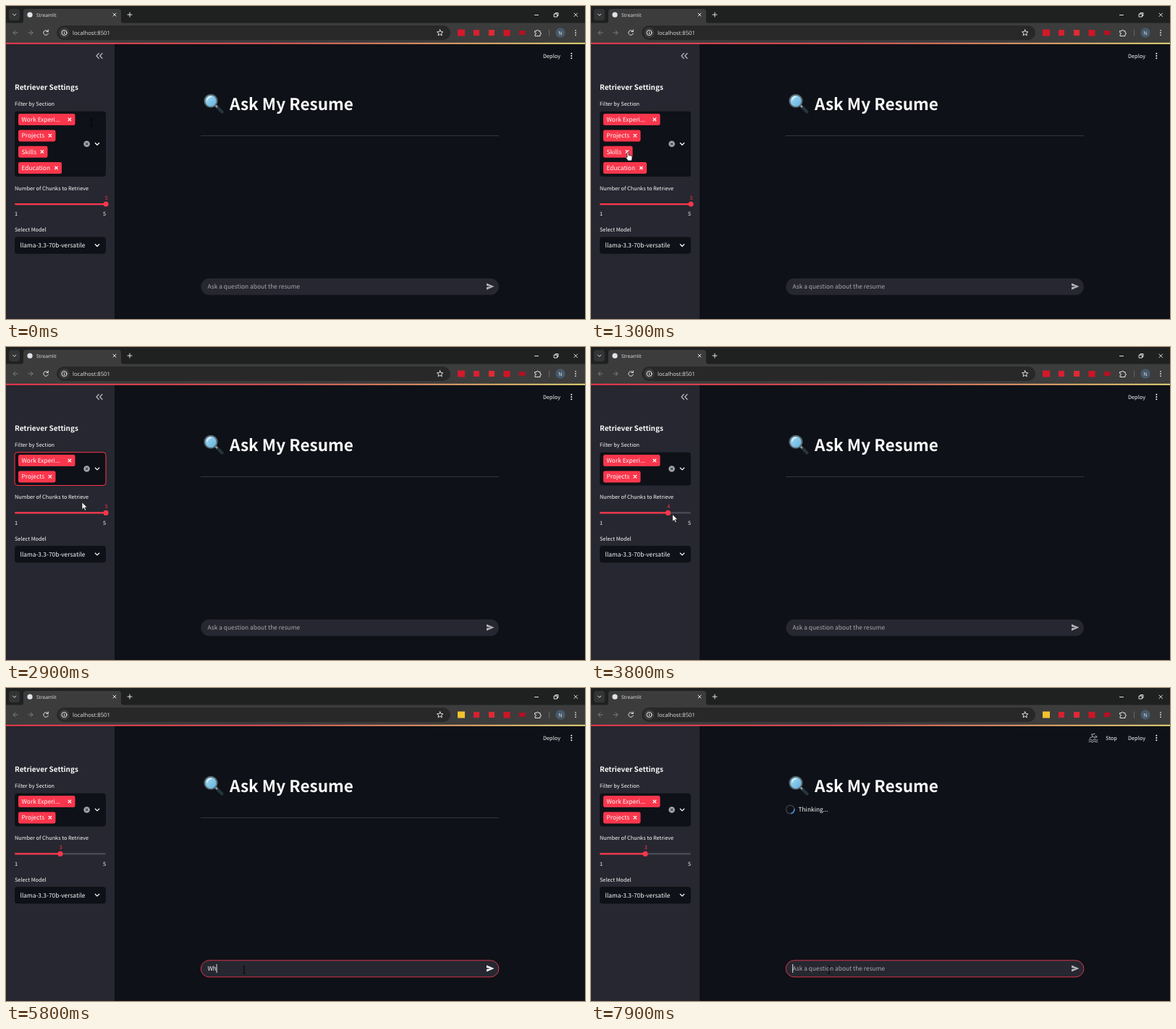
Write an HTML page that moves like this. It is 800 px wide and 433 px high and loops after 8 s.

```html
<!DOCTYPE html>
<html lang="en">
<head>
<meta charset="utf-8">
<title>Ask My Resume</title>
<style>
  html, body { margin: 0; width: 100%; height: 100%; overflow: hidden; background: #0e1117; }
  svg { display: block; width: 100vw; height: 100vh; }
  text { font-family: "Noto Sans CJK JP", "Noto Sans CJK SC", "Noto Sans CJK", sans-serif; font-size: 8.4px; fill: #fafafa; text-rendering: geometricPrecision; white-space: pre; }
  .small { font-size: 7.34px; }
  .chrome { font-family: "Open Sans", "Noto Sans", sans-serif; fill: #e3e3e3; }
  .red { fill: #fa364c; }
  .line { fill: none; stroke: #e3e3e3; stroke-width: 1; stroke-linecap: round; stroke-linejoin: round; }
  .dim { stroke: #7d7d7d; }
  .white { stroke: #fafafa; stroke-width: 1.3; }
</style>
</head>
<body>
<svg viewBox="0 0 800 433" preserveAspectRatio="none">
  <defs>
    <linearGradient id="bar"><stop stop-color="#f5384b"/><stop offset=".45" stop-color="#e8575a"/><stop offset="1" stop-color="#f0e27a"/></linearGradient>
    <linearGradient id="lens" x2="1" y2="1"><stop stop-color="#a9dcf4"/><stop offset="1" stop-color="#5fb0dc"/></linearGradient>
  </defs>

  <!-- browser window -->
  <rect width="800" height="52" fill="#1f2020"/>
  <rect x="4" y="4" width="15" height="16" rx="4" fill="#333435"/>
  <path class="line" d="M9.5 11l2.2 2.2 2.2-2.2"/>
  <path d="M20 24q4 0 4-4V8q0-4 4-4H155q4 0 4 4v12q0 4 4 4z" fill="#3c3c3c"/>
  <circle cx="33" cy="12.2" r="3.6" fill="#dfe2e8"/>
  <text class="chrome" x="42" y="14.7" style="font-size:6.6px">Streamlit</text>
  <path class="line" d="M148 10l4 4m0-4l-4 4M168 12h6m-3-3v6M730.500 12.500h5M785 10l4.500 4.500m0-4.500l-4.500 4.500M757.500 11h4v4h-4zM759 11V9.500h4V13.500h-1.500"/>
  <rect y="23.500" width="800" height="28" fill="#3c3c3c"/>
  <path class="line dim" d="M16 37h-6m3-3l-3 3l3 3M31 37h6m-3-3l3 3l-3 3"/>
  <path class="line" d="M57.800 35A3.300 3.300 0 1 0 58.300 38M58.300 33v2.500h-2.500"/>
  <rect x="70" y="27" width="544" height="20" rx="10" fill="#282828"/>
  <circle cx="80.500" cy="37" r="7" fill="#3c3c3c"/>
  <circle class="line" cx="80.500" cy="37" r="3.500"/>
  <path class="line" d="M80.500 36.800v1.700M80.500 35.200v.01"/>
  <text class="chrome" x="92" y="39.700" style="font-size:7.7px">localhost:8501</text>
  <path id="star" class="line"/>
  <rect id="badge" x="624" y="32.500" width="10" height="9"/>
  <rect x="646" y="33" width="8" height="8" fill="#d81f30"/>
  <rect x="667" y="33" width="8" height="8" fill="#e02a35"/>
  <rect x="687.500" y="33" width="9" height="8.500" fill="#cf1525"/>
  <rect x="709" y="34" width="8.500" height="6" fill="#b01222"/>
  <path class="line" d="M731 34.500h2.200a1.300 1.300 0 0 1 2.600 0h2.200v2.200a1.300 1.300 0 0 1 0 2.600v2.200h-7v-2.200a1.300 1.300 0 0 0 0-2.600z"/>
  <path d="M750.500 32.500v9" stroke="#666"/>
  <circle cx="766" cy="37" r="6.700" fill="#465a6b"/>
  <text class="chrome" x="766" y="39.500" text-anchor="middle" style="font-size:7px">N</text>
  <g fill="#e3e3e3"><circle cx="787" cy="33.800" r=".9"/><circle cx="787" cy="37" r=".9"/><circle cx="787" cy="40.200" r=".9"/></g>

  <!-- page -->
  <rect y="51" width="800" height="382" fill="#0e1117"/>
  <rect y="51" width="150" height="382" fill="#262730"/>
  <rect y="50.800" width="800" height="1.900" fill="url(#bar)"/>
  <text class="small" x="742" y="71.600">Deploy</text>
  <g fill="#fafafa"><circle cx="781.300" cy="65.800" r="1"/><circle cx="781.300" cy="69" r="1"/><circle cx="781.300" cy="72.200" r="1"/></g>
  <g id="running">
    <text class="small" x="711" y="71.600">Stop</text>
    <g class="line" style="stroke:#b4b5ba">
      <circle cx="697.500" cy="67.500" r="1.300"/>
      <path d="M689 69.500l4.500-2.500-2-2.800 4.500-.8M693.500 67l2.500 2.500M688 71.800q1.500-1.200 3 0t3 0 3 0 3 0M688 74.300q1.500-1.200 3 0t3 0 3 0 3 0"/>
    </g>
  </g>

  <path d="M290.500 138.500l8 8" stroke="#26343c" stroke-width="4.200" stroke-linecap="round"/>
  <path d="M289 137l3 3" stroke="#8a969d" stroke-width="2.500"/>
  <circle cx="283" cy="131.300" r="8.600" fill="url(#lens)" stroke="#596970" stroke-width="1.900"/>
  <path d="M278 130q1-4 5-4.500" fill="none" stroke="#e6f6fd" stroke-width="1.500" stroke-linecap="round"/>
  <text x="309" y="143.500" font-weight="700" style="font-size:22.6px">Ask My Resume</text>
  <path id="divider" d="M269 179.500H681" stroke="#343640"/>
  <g id="thinking">
    <circle cx="275.300" cy="168" r="5.700" fill="none" stroke="#343741" stroke-width="1.700"/>
    <path id="arc" d="M275.300 162.300a5.700 5.700 0 0 1 5.700 5.700" fill="none" stroke="#4b86d8" stroke-width="1.700"/>
    <text x="286.500" y="171">Thinking...</text>
  </g>

  <rect id="field" x="269.300" y="376.800" width="411.600" height="23" rx="11.500" fill="#262730"/>
  <text id="question" x="278.500" y="391.100"></text>
  <path id="caret" d="M0 382v12" stroke="#fafafa" stroke-width=".9"/>
  <path id="send" d="M664 383.500l10.500 4.500-10.500 4.500v-3.500l6-1-6-1z"/>

  <!-- sidebar -->
  <path id="collapse" class="line" style="stroke:#b9bac0;stroke-width:1.200" d="M128.300 65.500l-3.300 3.500 3.300 3.500M133 65.500l-3.300 3.500 3.300 3.500"/>
  <text x="12" y="115.900" font-weight="700" style="font-size:9.95px">Retriever Settings</text>
  <text class="small" x="12" y="138.200">Filter by Section</text>
  <rect id="select" x="12" y="145.700" width="126" rx="4" fill="#0e1117"/>
  <g id="tags"></g>
  <g id="controls">
    <circle cx="111.600" r="4.300" fill="#a3a5ab"/>
    <path d="M110 -1.600l3.200 3.200m0-3.200l-3.200 3.200" stroke="#0e1117"/>
    <path class="line white" d="M123.300 -1.300l2.700 2.700 2.700-2.700"/>
  </g>
  <g id="lower">
    <text class="small" x="12" y="254.600">Number of Chunks to Retrieve</text>
    <text id="amount" class="small red" y="267.600" text-anchor="middle"></text>
    <rect x="12" y="272.900" width="126" height="2.300" rx="1.100" fill="#4a4c56"/>
    <rect id="fill" class="red" x="12" y="272.900" height="2.300" rx="1.100"/>
    <circle id="thumb" class="red" cy="274" r="3.600"/>
    <text class="small" x="12" y="290.200">1</text>
    <text class="small" x="138" y="290.200" text-anchor="end">5</text>
    <text class="small" x="12" y="312.400">Select Model</text>
    <rect x="12" y="319.500" width="126" height="23.300" rx="4" fill="#0e1117"/>
    <text x="19.500" y="334.200">llama-3.3-70b-versatile</text>
    <path class="line white" d="M123.300 329.800l2.700 2.700 2.700-2.700"/>
  </g>

  <g id="pointer" stroke-linejoin="round">
    <path id="arrow" d="M0 0v10l2.400-2.200 1.700 3.700 1.700-.8-1.700-3.500h3.200z" fill="#fff" stroke="#111" stroke-width=".7"/>
    <path id="hand" d="M-1 1q1-1.500 2 0v3.500q3 0 4.500 1.200.8.800.3 3.300l-.8 3H.2L-3 7.500q0-1.500 2 0z" fill="#fff" stroke="#111" stroke-width=".7"/>
    <path id="beam" d="M-1.500-5h3M-1.500 5h3M0-5V5" fill="none" stroke="#000" stroke-width=".9"/>
  </g>
</svg>
<script>
const LOOP = 8000, STEP = 100, ROW = 22.3;
const SKILLS_OFF = 1600, EDUCATION_OFF = 2500, DRAG = 3500, RELEASE = 4200;
const LEAVE = 4500, FOCUS = 5600, TYPE = 5700, TYPED = 6800, ENTER = 7400;
const THINK = 7500, RUNNING = 7700;
const QUESTION = "What are the key strengths?";
const HINT = "Ask a question about the resume";

// time, x, y of the pointer
const PATH = [
  [0, 118, 161], [500, 118, 161], [1000, 53, 203], [1300, 51, 202], [1700, 51, 202],
  [2100, 73, 200.5], [2600, 73, 200.5], [3200, 137, 229], [DRAG, 138, 229],
  [3800, 112.5, 231.5], [RELEASE, 75, 231.5], [4400, 76, 232],
  [4800, 303, 342], [5200, 329, 390], [LOOP, 329, 390]
];

const el = Object.fromEntries([...document.querySelectorAll("[id]")].map(n => [n.id, n]));
const set = (node, attrs) => Object.entries(attrs).forEach(([k, v]) => node.setAttribute(k, v));
const show = (node, on) => set(node, { visibility: on ? "visible" : "hidden" });
const move = (node, x, y) => set(node, { transform: `translate(${x} ${y})` });

function addTag(label, width) {
  const g = document.createElementNS("http://www.w3.org/2000/svg", "g");
  const x = width + 9.4;
  g.innerHTML = `<rect class="red" x="17" y="149.100" width="${width}" height="16" rx="2.300"/>
    <text x="21.500" y="160.200">${label}</text>
    <path class="line white" d="M${x - 1.8} 155.200l3.600 3.600m0-3.600l-3.600 3.600"/>`;
  el.tags.append(g);
  return g;
}
const tags = [["Work Experi...", 78.5], ["Projects", 51.5], ["Skills", 40.5], ["Education", 60]]
  .map(([label, width]) => addTag(label, width));

const starPoints = Array.from({ length: 10 }, (_, i) => {
  const r = i % 2 ? 2 : 4.4, a = i * Math.PI / 5;
  return `${599.7 + r * Math.sin(a)} ${37.2 - r * Math.cos(a)}`;
});
set(el.star, { d: `M${starPoints.join("L")}z` });

function pointerAt(t) {
  const i = PATH.findIndex((p, n) => n && t <= p[0]);
  const [t0, x0, y0] = PATH[i - 1], [t1, x1, y1] = PATH[i];
  const k = (t - t0) / (t1 - t0), e = k * k * (3 - 2 * k);
  return [x0 + (x1 - x0) * e, y0 + (y1 - y0) * e];
}

function drawFilter(t) {
  const removed = (t >= SKILLS_OFF) + (t >= EDUCATION_OFF);
  const height = 90.4 - removed * ROW;
  const focused = t >= SKILLS_OFF && t < DRAG;
  set(el.select, { height, stroke: focused ? "#fa364c" : "none" });
  tags.forEach((tag, i) => move(tag, 0, (i === 3 && removed ? 2 : i) * ROW));
  show(tags[2], removed < 1);
  show(tags[3], removed < 2);
  move(el.controls, 0, 145.6 + height / 2);
  move(el.lower, 0, -removed * ROW);
}

function drawSlider(t, x) {
  const dragged = Math.min(5, Math.max(3, Math.round(1 + (x - 12) / 31.5)));
  const value = t < DRAG ? 5 : t < RELEASE ? dragged : 3;
  const cx = 12 + (value - 1) * 31.5;
  el.amount.textContent = value;
  set(el.amount, { x: cx + .7 });
  set(el.thumb, { cx });
  set(el.fill, { width: cx - 12 });
}

function drawField(t) {
  const focused = t >= FOCUS;
  const part = Math.min(1, Math.max(0, (t - TYPE) / (TYPED - TYPE)));
  const typed = t < ENTER ? QUESTION.slice(0, Math.round(part * QUESTION.length)) : "";
  el.question.textContent = typed || HINT;
  el.question.style.fill = typed ? "#fafafa" : "#a9aab0";
  set(el.field, { stroke: focused ? "#d8344d" : "none" });
  set(el.send, { fill: typed ? "#fafafa" : "#b4b5ba" });
  const base = t < TYPE ? FOCUS : t < ENTER ? Math.min(t, TYPED) : ENTER;
  show(el.caret, focused && (t - base) % 1060 < 530);
  move(el.caret, 278.7 + (typed ? el.question.getComputedTextLength() : 0), 0);
  set(el.badge, { fill: focused ? "#f2c32e" : "#d4192b" });
}

function drawPointer(t, x, y) {
  const kind = t < 900 || t >= 5200 ? "beam" : t < EDUCATION_OFF ? "hand" : "arrow";
  move(el.pointer, x, y);
  for (const name of ["beam", "hand", "arrow"]) show(el[name], name === kind);
}

function update(t) {
  const [x, y] = pointerAt(t);
  drawFilter(t);
  drawSlider(t, x);
  drawField(t);
  drawPointer(t, x, y);
  show(el.collapse, t < LEAVE);
  show(el.divider, t < THINK);
  show(el.thinking, t >= THINK);
  show(el.running, t >= RUNNING);
  set(el.arc, { transform: `rotate(${80 + (t - 7900) * .48} 275.3 168)` });
}

const start = performance.now();
function tick() {
  const t = (performance.now() - start) % LOOP;
  update(Math.floor(t / STEP) * STEP);
  requestAnimationFrame(tick);
}
tick();
</script>
</body>
</html>
```
